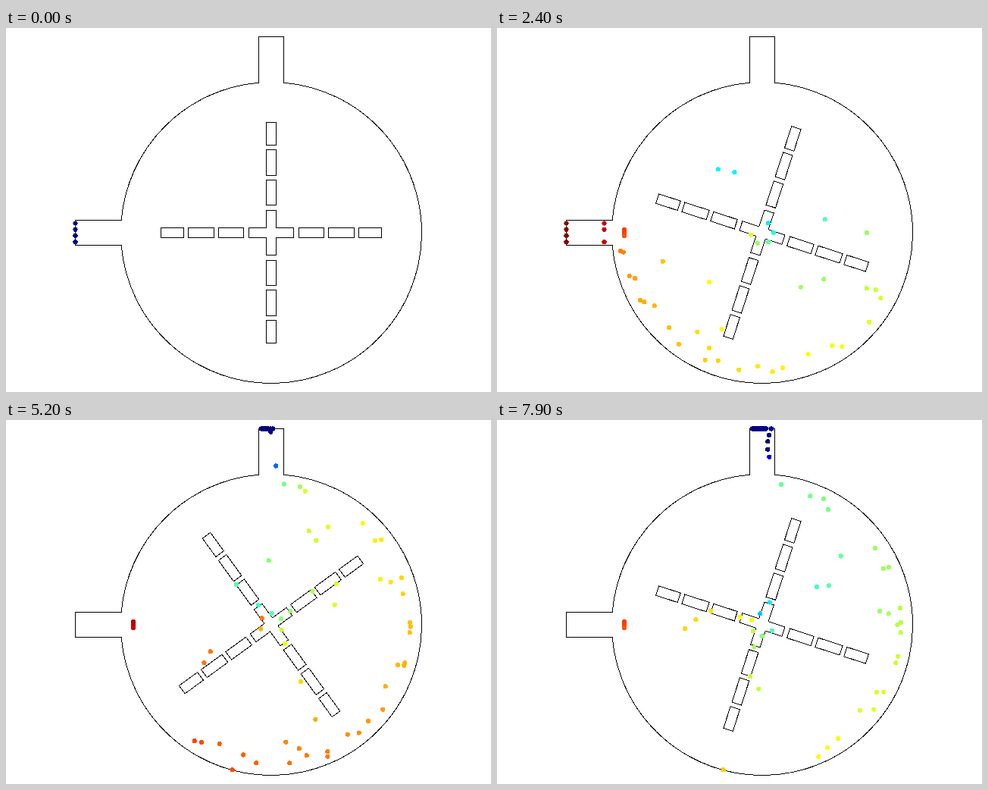
An HTML page for the animation above (8 s loop, 640 by 480 pixels).

```html
<!DOCTYPE html>
<html lang="en">
<head>
<meta charset="utf-8">
<title>Stirred tank tracers</title>
<style>
html, body { margin: 0; width: 100%; height: 100%; overflow: hidden; background: #fff; }
svg { display: block; width: 640px; height: 480px; shape-rendering: crispEdges; }
.line { fill: none; stroke: #000; stroke-width: 1; }
</style>
</head>
<body>
<svg viewBox="0 0 640 480">
  <path class="line" d="M152.2 253.5H91.5V286.5H152.2A198.5 198.5 0 1 0 366.5 72.2V11.5H333.5V72.2A198.5 198.5 0 0 0 152.2 253.5"/>
  <g id="rotor" class="line"></g>
  <g id="dots"></g>
</svg>
<script>
const CX = 350, CY = 270, STEPS = 80, STEP_MS = 100, LAST_EMIT = 36;
const INLET_X = 91.5, INLET_SPEED = 25, ENTRY_AGE = 2.5, TURN = 18;
const MOUTH = { angle: 267, r: 187, x: 360, y: 83 };
const rotor = document.getElementById('rotor');
const dots = document.getElementById('dots');

// Angles are in degrees, counterclockwise from the left side of the tank
const rad = deg => deg * Math.PI / 180;
const place = (deg, r) => [CX - r * Math.cos(rad(deg)), CY + r * Math.sin(rad(deg))];
const mix = (a, b, t) => a + (b - a) * t;
const clamp = v => Math.max(0, Math.min(1, v));
const random = n => {
  const v = Math.sin(n * 12.9898) * 43758.5453;
  return v - Math.floor(v);
};
const inletY = lane => 257.5 + lane * 8.2;

// The flow repeats every 10 steps, so lanes of equal phase share a path.
// Inner paths turn faster and pass the outlet once before leaving.
function makeParticle(born, lane) {
  const inward = random(born % 10 * 4 + lane + 1) ** 3;
  const rate = 0.8 + 1.2 * inward;
  const exitAngle = MOUTH.angle + (inward > 0.5 ? 360 : 0);
  const exitAge = ENTRY_AGE - 30 + Math.sqrt(900 + 10 * exitAngle / rate);
  return { born, lane, rate, exitAngle, exitAge, r: 184 - 105 * inward, endX: 337 + born + lane / 2 };
}

const particles = [];
for (let born = 0; born <= LAST_EMIT; born += 2)
  for (const lane of [0, 1, 3]) particles.push(makeParticle(born, lane));

function follow(p, age) {
  if (age < ENTRY_AGE) return [INLET_X + INLET_SPEED * age, inletY(p.lane)];
  if (age >= p.exitAge) {
    const t = clamp((age - p.exitAge) / 3);
    return [mix(MOUTH.x, p.endX, t), mix(MOUTH.y, 11.5, t)];
  }
  const u = age - ENTRY_AGE;
  const deg = p.rate * (6 * u + 0.1 * u * u);
  const r = mix(p.r, 196, Math.exp(-u / 1.5));
  return place(deg, mix(r, MOUTH.r, clamp(1 - (p.exitAngle - deg) / 35)));
}

// Tracers caught by the rotor: ring radius, first angle, spacing, count
const rings = [[15, 28, 57, 5], [31, 0, 89, 3], [70, 93, 92, 2]];

function caught(step) {
  const list = [];
  let first = 8;
  for (const [r, from, gap, count] of rings)
    for (let i = 0; i < count; i++, first += 4)
      if (step >= first) list.push(place(from + gap * i + (step - 45) * TURN, r));
  return list;
}

function resting(step) {
  const list = [];
  for (let i = 0; i < 3; i++)
    if (step > 2 + 4 * i) list.push([168, 266 + 4 * i]);
  for (let i = 0; i < 6; i++) {
    const t = i / 5;
    if (step >= 30 + 3 * i) list.push(place(181 - 106 * t * t, 183 + 15 * t ** 4));
  }
  return list;
}

function positions(step) {
  // The flow slows down once the inlet has closed
  const over = Math.max(0, step - LAST_EMIT);
  const clock = Math.min(step, LAST_EMIT) + 25 * (1 - Math.exp(-over / 23));
  const list = particles.filter(p => clock >= p.born).map(p => follow(p, clock - p.born));
  list.push(...caught(step), ...resting(step));
  if (step <= LAST_EMIT && step % 2 === 0)
    for (let lane = 0; lane < 4; lane++) list.push([INLET_X, inletY(lane)]);
  return list;
}

// Pressure falls along the way round and toward the hub, and pulses with the rotor
function pressure(x, y, step) {
  if (step === 0) return 0;
  if (x < 160 && Math.abs(y - CY) < 17) return 1 - 0.0013 * (x - INLET_X);
  let a = Math.atan2(y - CY, CX - x);
  if (a < -0.7) a += 2 * Math.PI;
  const pulse = 0.02 + 0.08 * Math.cos(rad(72 * step + 20));
  const v = 0.8 - 0.057 * a - 0.15 * (1 - Math.hypot(x - CX, y - CY) / 175)
    + 0.1 * Math.exp(-Math.hypot(x - 165, y - 267) / 15) - pulse;
  return Math.min(v, Math.max(0, 0.011 * (y - 40)));
}

function jet(v) {
  const channel = c => Math.round(255 * clamp(1.5 - Math.abs(4 * v - c)));
  return `rgb(${channel(3)},${channel(2)},${channel(1)})`;
}

// Plus-shaped hub and three blocks on each arm
let outline = 'M343.5 240.5H356.5V263.5H379.5V276.5H356.5V299.5H343.5V276.5H320.5V263.5H343.5Z';
for (const [from, to] of [[36.5, 69.5], [75.5, 109.5], [115.5, 145.5]])
  for (const [a, b] of [[from, to], [-to, -from]])
    outline += `M${CX + a} 263.5H${CX + b}V276.5H${CX + a}ZM343.5 ${CY + a}V${CY + b}H356.5V${CY + a}Z`;
rotor.innerHTML = `<path d="${outline}"/>`;

let shown = -1;
function draw(now) {
  const step = Math.floor(now / STEP_MS) % STEPS;
  if (step === shown) return;
  shown = step;
  // Four equal arms: the rotor looks the same after every quarter turn
  rotor.setAttribute('transform', `rotate(${-TURN * step % 90} ${CX} ${CY})`);
  dots.innerHTML = positions(step).map(([x, y]) =>
    `<circle cx="${x.toFixed(1)}" cy="${y.toFixed(1)}" r="3.1" fill="${jet(pressure(x, y, step))}"/>`).join('');
}

const start = performance.now();
function tick() {
  draw(performance.now() - start);
  requestAnimationFrame(tick);
}
tick();
</script>
</body>
</html>
```
